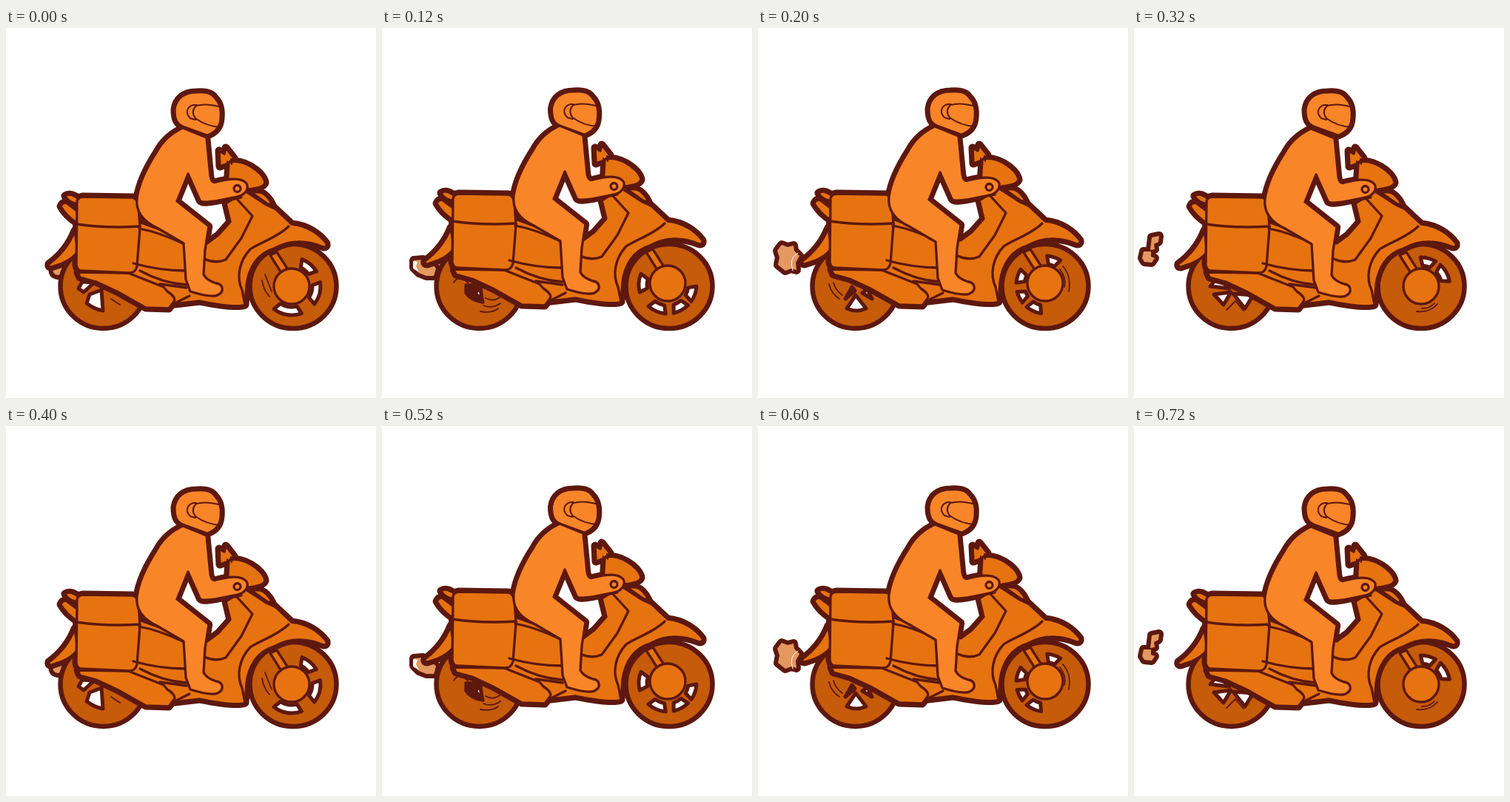
An HTML page with a canvas that plays this animation: 500 by 500 pixels, repeating every 800 ms.

```html
<!DOCTYPE html>
<html lang="en">
<head>
<meta charset="utf-8">
<title>Scooter ride</title>
<style>
html, body { margin: 0; width: 100%; height: 100%; overflow: hidden; background: #fff; }
canvas { display: block; width: 100%; height: 100%; }
</style>
</head>
<body>
<canvas id="stage" width="500" height="500"></canvas>
<script>
const ctx = document.getElementById('stage').getContext('2d');
const INK = '#5d180f', SKIN = '#f88528', BIKE = '#e67310', TIRE = '#c65b0a', FIRE = '#e49860';
const P = d => new Path2D(d);

const tail = P('M93 274C86 292 73 308 58 319Q57 323 61 323L76 318Q90 312 97 302Z');
const lights = [
  P('M80 227Q84 224 90 226L98 230V238Q84 236 80 227Z'),
  P('M74 241Q76 236 81 236L97 248V264Q81 254 74 241Z')
];
const frame = P('M174 260L240 284L272 291L287 280L303 262L297 237L310 229L328 219L354 235L386 265C408 267 424 279 433 291Q434 296 429 296C405 286 382 287 362 298C340 304 328 324 325 347L323 374Q312 379 262 369L228 373L160 330Z');
const exhaust = P('M97 330L165 331L213 350L218 356Q232 365 226 371L220 379L189 378L150 356L122 343L100 337Z');
const nub = P('M330 221L344 222Q354 226 360 239L354 238Z');
const pod = P('M301 182C318 175 348 194 350 209Q348 216 328 218L298 232Z');
const mirror = P('M288 166L295 170L297 162L308 176L300 183L289 187Z');
const box = P('M96 234Q97 229 104 228L171 229Q177 230 179 240L181 270L177 322Q175 331 166 331L101 328Q96 327 95 320Z');
const boxLine = P('M95 265Q135 271 181 268');
const bikeLines = P('M180 271Q207 276 241 292M172 318Q208 328 243 328M181 328Q212 345 244 347M208 346L244 351M312 231L333 254L318 284L297 313Q283 319 268 312M326 222L352 239L363 244M382 268C367 283 343 290 330 299C315 315 311 337 319 354L323 374M304 232L318 229M248 362L230 371');
const stem = P('M299 180V187M304 177L305 184');
const fork = P('M357 307L366 303L382 328L374 334Z');
const rider = P('M239 135C222 143 211 154 204 167C191 187 180 208 177 230C175 247 183 260 204 270L240 291L243 340L249 356C262 360 280 364 286 361C296 356 293 346 284 345Q271 341 267 333L269 300L274 268L231 234L246 197L262 233C265 237 274 235 282 234L312 228C323 226 329 217 325 210C317 201 300 204 284 208C279 210 277 206 276 200L271 148Z');
const helmet = P('M239 134C230 130 227 124 227 110C229 95 240 86 257 86Q277 84 283 94C290 101 292 112 291 122Q290 140 272 146Z');
const visor = P('M291 107Q271 101 257 105Q249 113 256 122Q271 133 290 134M257 104C247 103 240 113 249 122L256 124');

// Offsets for bike, rider and helmet; spoke gaps in degrees; rear gaps and exhaust fire.
const poses = [
  { ms: 120, bike: [0, 0], rider: [0, 0], head: [0, 0],
    gaps: [[-69, -31], [-8, 38], [70, 128]],
    rear: 'M98 352L103 343L119 344L105 357ZM113 360L129 354L131 382Q119 380 109 372Z',
    blur: 'M148 359L163 367M142 366L154 374M346 341Q348 354 356 363M350 333L359 356',
    fire: 'M64 325Q70 320 77 322Q78 332 70 334Q62 333 64 325Z' },
  { ms: 80, bike: [0, -4], rider: [1, -3], head: [1.5, -1],
    gaps: [[3, 35], [45, 78], [94, 132], [165, 202]],
    rear: 'M126 358L133 351L135 369Z', dark: 'M113 347L132 347L137 371Q120 369 113 358Z',
    blur: 'M97 344Q104 332 116 344M140 365Q151 371 160 363M137 375Q149 380 160 372M133 383Q148 386 157 379',
    fire: 'M43 314L55 313L66 317L73 325L70 335L60 335L50 331L43 324Z',
    white: 'M42 315L48 316L46 322L50 330L42 325Z' },
  { ms: 120, bike: [2, -4], rider: [0, -2], head: [3, -1],
    gaps: [[-86, -58], [98, 130], [142, 166], [184, 212]],
    rear: 'M120 379L132 361L146 379Q133 385 120 379ZM118 366L127 350L131 355ZM141 358L148 353L154 366Z',
    blur: 'M96 346Q99 359 110 366M102 344Q105 355 114 361M412 322Q424 336 420 356M408 326Q417 338 414 350',
    fire: 'M32 293L40 296L48 294L49 301L56 308L51 317L52 327L45 325L37 328L27 320L29 310L26 301Z',
    arc: 'M54 304Q41 311 47 328' },
  { ms: 80, bike: [2, 0], rider: [0, 1], head: [4, 0],
    gaps: [[-91, -60], [-48, -10]],
    rear: 'M103 349L113 337L129 352ZM108 360L131 357L121 374ZM134 359L161 361L150 379Z',
    blur: 'M125 381L137 369L148 382M382 383Q400 385 410 373M389 379Q400 379 406 372',
    fire: 'M24 283L34 281L33 289L27 292L28 299L22 300ZM13 302L23 302L23 309L28 311L24 317L14 316L11 311Z' }
];
const span = poses.reduce((sum, p) => sum + p.ms, 0);

function line(path, width = 3.3, color = INK) {
  ctx.lineWidth = width;
  ctx.strokeStyle = color;
  ctx.stroke(path);
}

function fill(path, color, width = 3.3) {
  ctx.fillStyle = color;
  ctx.fill(path);
  if (width) line(path, width);
}

function at([x, y], draw) {
  ctx.save();
  ctx.translate(x, y);
  draw();
  ctx.restore();
}

function disc(x, y, rx, ry = rx) {
  const p = new Path2D();
  p.ellipse(x, y, rx, ry, 0, 0, 7);
  return p;
}

function gap(x, y, from, to) {
  const p = new Path2D(), rad = Math.PI / 180;
  p.arc(x, y, 39, from * rad, to * rad);
  p.arc(x, y, 28, (to - 5) * rad, (from + 5) * rad, true);
  p.closePath();
  return p;
}

function draw(pose) {
  ctx.fillStyle = '#fff';
  ctx.fillRect(0, 0, 500, 500);
  ctx.lineJoin = ctx.lineCap = 'round';
  const [bx, by] = pose.bike;

  const smoke = P(pose.fire);
  line(smoke, 12);
  fill(smoke, FIRE, 0);
  if (pose.white) fill(P(pose.white), '#fff', 0);
  if (pose.arc) line(P(pose.arc), 1, '#fff');

  at(pose.bike, () => [tail, ...lights].forEach(p => line(p, 11)));
  fill(disc(131.5, 349, 58, 57), TIRE, 6.5);
  fill(disc(388, 349, 58.5, 57), TIRE, 6.5);
  if (pose.dark) fill(P(pose.dark), INK);
  fill(P(pose.rear), '#fff', 5);
  for (const [a, b] of pose.gaps) fill(gap(386 + bx, 349 + by / 2, a, b), '#fff', 5);
  line(P(pose.blur), 1.8);

  const parts = [frame, exhaust, nub, pod, mirror, box];
  at(pose.bike, () => parts.forEach(p => line(p, 11)));
  at(pose.rider, () => line(rider, 10.5));
  at(pose.head, () => line(helmet, 9));

  at(pose.bike, () => {
    fill(fork, BIKE);
    fill(disc(386, 349, 24), BIKE);
    [tail, ...lights, ...parts].forEach(p => fill(p, BIKE));
    line(bikeLines);
    line(boxLine);
    line(stem, 2);
  });
  at(pose.head, () => {
    fill(helmet, SKIN, 5);
    line(visor, 2);
  });
  at(pose.rider, () => {
    fill(rider, SKIN);
    line(disc(312.5, 217, 4.5));
  });
}

let shown;
function tick(now) {
  let t = now % span, i = 0;
  while (t >= poses[i].ms) t -= poses[i++].ms;
  if (i !== shown) draw(poses[shown = i]);
  requestAnimationFrame(tick);
}
tick(0);
</script>
</body>
</html>
```
